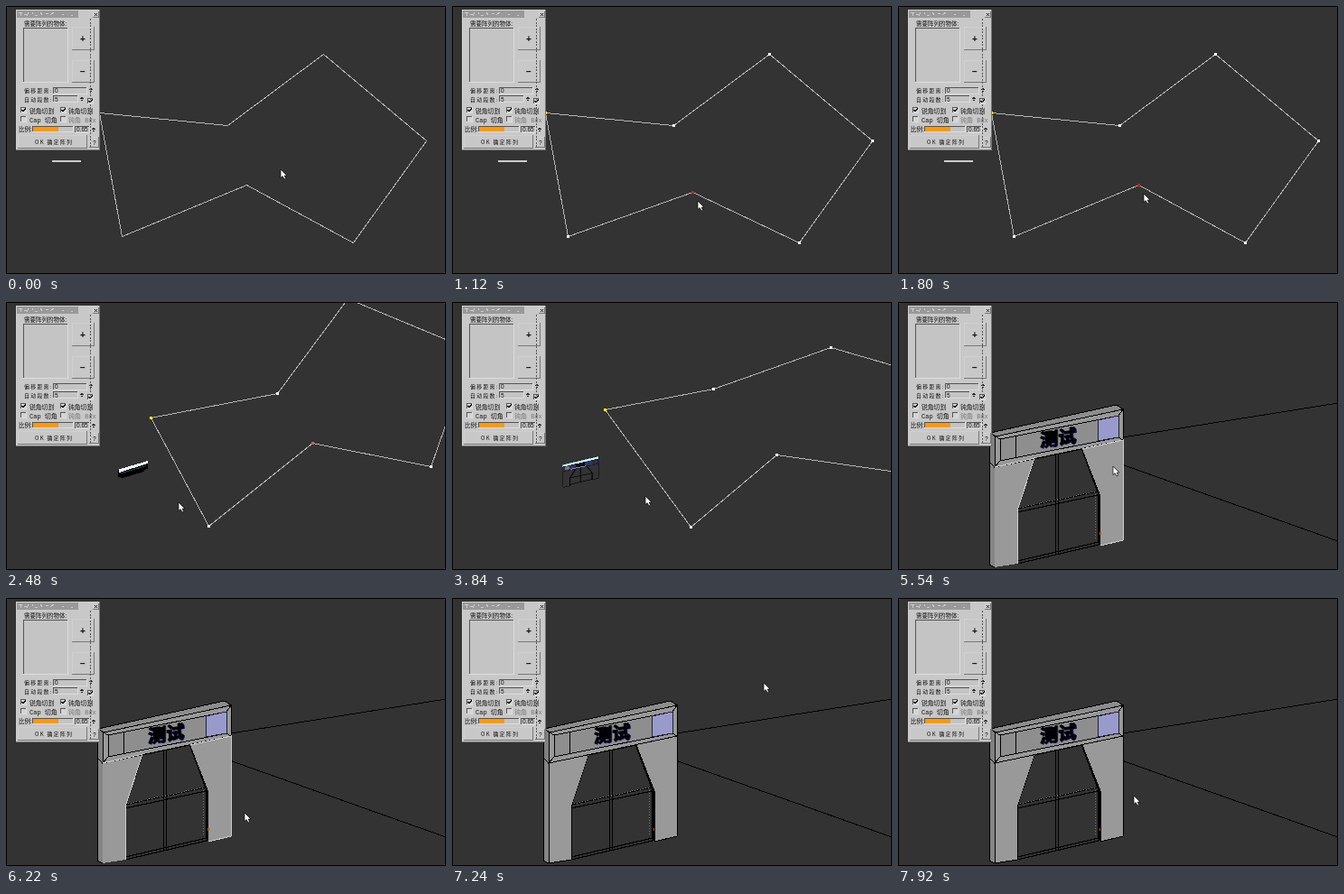
Write an HTML page that moves like this. It is 487 px wide and 297 px high and loops after 8 s.

```html
<!DOCTYPE html>
<html lang="zh">
<head>
<meta charset="utf-8">
<style>
html, body { margin: 0; width: 100%; height: 100%; overflow: hidden; background: #000; }
svg { display: block; width: 487px; height: 297px; shape-rendering: crispEdges; }
text { font: 6.5px "Noto Sans CJK SC", "Noto Sans CJK", sans-serif; fill: #111; }
.spaced { letter-spacing: 1.3px; font-size: 5.9px; }
.mono { font: 7px "Liberation Mono", "Noto Sans CJK SC", monospace; }
.number { font: 6.5px "Liberation Sans", sans-serif; }
.big { font: bold 10px "Liberation Sans", sans-serif; text-anchor: middle; }
.sign { font: bold 20px "Noto Sans CJK SC", "Noto Sans CJK", sans-serif; fill: #000; stroke: #000; stroke-width: .8; }
.sign.shade { fill: #116; stroke: #116; }
</style>
</head>
<body>
<svg viewBox="0 0 487 297">
  <rect x="1" y="1" width="485" height="295" fill="#333"/>
  <clipPath id="view"><rect x="1" y="1" width="485" height="295"/></clipPath>
  <g clip-path="url(#view)">
    <g id="scene" transform="translate(-1 -1)"></g>
    <g id="panel"></g>
    <path id="cursor" d="M0 0V9.5L2.2 7.6L4 11L5.6 10.2L4.2 7H7Z" fill="#fff" stroke="#000" stroke-width=".7" shape-rendering="auto"/>
  </g>
</svg>
<script>
const $ = id => document.getElementById(id);
const rect = (x, y, w, h, fill) => `<rect x="${x}" y="${y}" width="${w}" height="${h}" fill="${fill}"/>`;
const path = (d, fill = 'none', stroke = 'none', width = 1) =>
  `<path d="${d}" fill="${fill}" stroke="${stroke}" stroke-width="${width}"/>`;
const label = (x, y, text, cls = '', style = '') => `<text x="${x}" y="${y}" class="${cls}" style="${style}">${text}</text>`;

// ---- dialog ----
const bevel = (x, y, w, h, light, dark, fill = '#c8c8c8') =>
  rect(x, y, w, h, dark) + rect(x, y, w - 1, h - 1, light) + rect(x + 1, y + 1, w - 2, h - 2, fill);
const raised = (x, y, w, h) => bevel(x, y, w, h, '#d0d0d0', '#777');
const sunken = (x, y, w, h, fill = '#c4c4c4') => bevel(x, y, w, h, '#555', '#ddd', fill);
const spinner = (x, y) =>
  path(`M${x + 1} ${y + 3.5}h4l-2 -2.5zM${x + 1} ${y + 4.5}h4l-2 2.5z`, '#222');
const tick = (x, y) => path(`M${x + 1.5} ${y + 3}l1.5 2l3 -4`, 'none', '#000', 1.3);
const checkbox = (x, y, on) => sunken(x, y, 7, 7, '#d4d4d4') + (on ? tick(x, y) : '');

$('panel').innerHTML = [
  raised(11, 4, 93, 156),
  rect(12, 5, 68, 8, '#999'),
  path('M14 7h4M16 7v4M20 9h4M25 7l-2 4M29 7v2M32 10h3M38 7l2 3M44 8h3M49 10l4 -3M62 9h2M72 10h2', 'none', '#ccc'),
  raised(96, 6, 7, 7), path('M98 8l3 3M101 8l-3 3', 'none', '#222'),
  label(20, 22, '需要阵列的物体:'),
  sunken(19, 24, 50, 61),
  raised(73, 23, 25, 26), label(85, 39.5, '+', 'big'),
  raised(73, 60, 25, 25), label(85, 76, '−', 'big'),
  label(20, 95.5, '偏移距离:', 'spaced'), sunken(52, 90, 38, 8), label(54, 96, '0', 'number'), spinner(91, 89),
  label(20, 105.5, '自动段数:', 'spaced'), sunken(52, 99, 28, 8), label(54, 105.5, '5', 'number'), spinner(81, 99),
  checkbox(90, 102, true),
  checkbox(16, 112, true), label(26, 118.5, '锐角切割', '', 'font-size:6.8px'),
  checkbox(60, 112, true), label(69, 118.5, '钝角切割', '', 'font-size:6.8px'),
  checkbox(16, 122, false), label(26, 128.5, 'Cap 切角', 'mono'),
  checkbox(60, 122, false), label(69, 128.5, '钝角 Bdx', 'mono', 'fill:#777'),
  label(14, 138.5, '比例:'), sunken(29, 133, 46, 7), rect(30, 134, 28, 5, '#f90'),
  sunken(76, 133, 17, 8), label(78, 139, '0.65', 'number'), spinner(94, 133),
  raised(13, 143, 77, 15), label(32, 153, 'OK 确定阵列', 'spaced'),
  raised(92, 145, 11, 12), label(96, 154, '?', 'number'),
  `<path d="M93.5 14V156" stroke="#555" stroke-dasharray="2 1.5"/>`
].join('');

// ---- outline with editable corners ----
const flat = [[104,119],[246,133],[352,54],[466,150],[385,263],[267,199],[129,256]];
const turning = [[108,150],[245,130],[330,38],[460,105],[410,245],[285,205],[170,290]];
const turned = [[161,129],[301,102],[379,-3],[516,54],[471,183],[340,157],[225,249]];
const tilting = [[170,120],[290,97],[420,51],[520,80],[500,190],[360,170],[265,250]];
const tilted = [[190,115],[350,87],[500,59],[640,120],[540,230],[400,195],[300,240]];
const close = [[251,98],[500,53.5],[700,18],[800,90],[700,190],[478,296],[403,300]];
const moved = (points, index, x, y) => points.map((p, i) => i === index ? [x, y] : p);

function outline(points, { color = '#b4b4b4', corners = false, selected = -1 } = {}) {
  let out = path('M' + points.map(p => p.map(v => v + .5)).join('L') + 'Z', 'none', color);
  if (corners) points.forEach(([x, y], i) => {
    out += rect(x - 1, y - 1, 3, 3, i === selected ? '#e01818' : i ? '#fff' : '#ff0');
  });
  return out;
}

// ---- gate, from thin bar to full model ----
const flatBar = rect(52, 172, 32, 2, '#ccc');
const bar = (x, y) => `<g transform="translate(${x} ${y})">` +
  path('M0 10L33 1V9L29 10V12L5 19L0 18Z', '#000') + path('M1 9.5L33 0V3L1 13Z', '#eff') +
  path('M2 14L31 5.5', 'none', '#245') + '</g>';

function smallGate(shaded) {
  const body = shaded ? '#999' : 'none';
  const edge = shaded ? '#ddd' : '#000';
  return path('M167 196L196 189L183 212L182 232L167 235ZM220 183L246 177V213L232 217V199Z', body, edge) +
    path('M183 212L232 200M183 228L232 215', 'none', '#000', 1.5) +
    path('M206.5 186V221M196 189L183 212V232M220 183L232 199V217', 'none', '#000', 2) +
    path('M167 184L247 164V177L167 196Z', shaded ? '#999' : '#333', '#115') +
    path('M171 185L181 183V191L171 193Z', '#777') +
    path('M183 182L193 180V189L183 191ZM217 172L231 169V178L217 181Z', '#336') +
    path('M196 180L215 175V183L196 187Z', '#0a0a18') +
    path('M234 168L245 165V175L234 177Z', '#333', '#115') +
    path('M184 191L217 183', 'none', '#eee') +
    path('M166 180L246 159V165L167 185Z', '#cff', '#000', .7);
}
const scaledGate = (x, y, sx, sy) =>
  `<g transform="translate(${x} ${y}) scale(${sx} ${sy}) translate(-166 -159)">${smallGate()}</g>`;

const sign = (x, y, cls) => `<text class="sign ${cls}" transform="translate(${x} ${y}) skewY(-8)">测试</text>`;

function gate(selected) {
  const header = selected === 'header' ? '#ccc' : '#000';
  const pillars = selected === 'pillars'
    ? path('M108 184L152 174L133 232V291M205 164L250 154V265L225 271', 'none', '#ccc')
    : path('M108 184V295L133 291V232M205 164L225 215V271L250 265V154', 'none', '#000');
  return path('M250 151L488 113M250 181.5L488 266', 'none', '#000') +
    path('M133 230L222 211M133 234L222 215M133 288L223 267M133 291L223 270', 'none', '#000', 1.2) +
    path('M175.5 171V281M178.5 170V280M205 165L224 214V270', 'none', '#000', 1.3) +
    path('M206 166L223 212V268', 'none', '#000', 3) +
    path('M152 175L133 232V291M152 175L205 164', 'none', '#000') +
    `<path d="M136 229L219 211M219.5 214V265" fill="none" stroke="#777" stroke-dasharray="1 2"/>` +
    path('M102 178L108 184V295L102 292Z', '#858585') +
    path('M102.5 178V292L108 295', 'none', '#000') +
    path('M108 184L152 174L133 232V291L108 295ZM205 164L250 154V265L225 271V215Z', '#999') +
    rect(224, 256, 2, 3, '#a52') +
    path('M103 146L243 115L250 120L109 150Z', '#8c8c8c', header) +
    path('M103 146L109 150L108 184L102 178Z', '#808080', header) +
    path('M109 150L250 120V154L108 184Z', '#999', header) +
    path('M114 153L245 127V151L114 177Z', '#8e8e8e', '#000') +
    path('M109 150L114 153M250 120L245 127M250 154L245 151M108 184L114 177M131.5 149V173', 'none', '#000') +
    path('M222 132L245 127V151L222 155Z', '#99c', '#223') +
    pillars + sign(159, 162, 'shade') + sign(158, 161.5, '');
}

// ---- timeline: cursor position and scene of each step ----
const edit = (points, selected = -1) => outline(points, { corners: true, selected });
const dragInner = (x, y) => flatBar + edit(moved(flat, 5, x, y), 5);
const dragLower = (x, y) => bar(125, 177) + edit(moved(turned, 6, x, y), 6);

const steps = [
  [305, 181, flatBar + outline(flat)],
  [252, 233, flatBar + outline(flat)],
  [259, 213, flatBar + edit(flat)],
  [271, 205, dragInner(266, 197)],
  [273, 216, dragInner(267, 207)],
  [273, 224, dragInner(267, 215)],
  [273, 208, dragInner(267, 199)],
  [200, 230, bar(60, 184) + edit(turning, 5)],
  [192, 222, bar(125, 177) + edit(turned) + rect(339, 156, 3, 3, '#b66')],
  [219, 283, bar(125, 177) + edit(turned)],
  [230, 279, dragLower(224, 270)],
  [232, 258, dragLower(226, 249)],
  [215, 215, scaledGate(123, 172, .5, .45) + edit(tilting)],
  [205, 195, scaledGate(130, 167, .7, .7) + edit(tilted)],
  [198, 185, smallGate() + edit(close)],
  [239, 192, smallGate() + outline(close)],
  [228, 175, outline(close, { color: '#000' }) + smallGate(true)],
  [239, 182, gate('pillars')],
  [92, 240, gate()],
  [265, 238, gate('pillars')],
  [223, 140, gate('pillars')],
  [180, 140, gate('header')],
  [346, 94, gate()],
  [180, 209, gate('header')],
  [262, 219, gate()]
];

let shown = -1;
function render(now) {
  const t = now % 8000;
  const index = t < 100 ? 0 : 1 + Math.floor((t - 100) / 340);
  if (index !== shown) {
    const [x, y, scene] = steps[index];
    $('scene').innerHTML = scene;
    $('cursor').setAttribute('transform', `translate(${x - 1} ${y})`);
    shown = index;
  }
  requestAnimationFrame(next => render(Math.max(0, next - start)));
}
const start = performance.now();
render(0);
</script>
</body>
</html>
```
